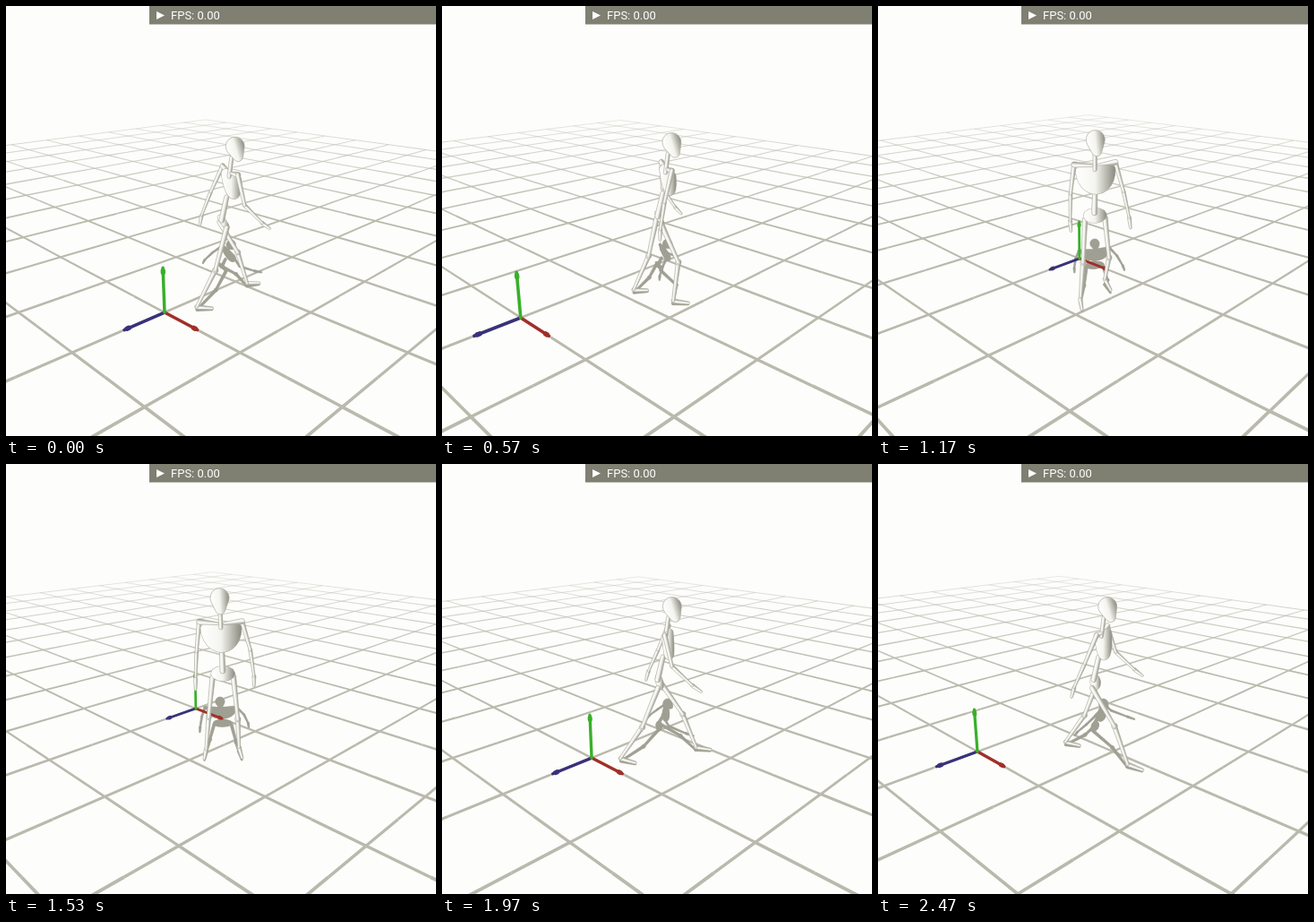
These frames come from a looping animation (480x480 px, 2510 ms). An HTML page with a canvas:

```html
<!DOCTYPE html>
<html lang="en">
<head>
<meta charset="utf-8">
<title>Walking skeleton</title>
<style>
  html, body { margin: 0; width: 100%; height: 100%; overflow: hidden; background: #fdfdfb; }
  canvas { display: block; }
</style>
</head>
<body>
<canvas id="stage" width="480" height="480"></canvas>
<script>
const ctx = document.getElementById('stage').getContext('2d');
const LOOP = 2510, STEP = 100 / 3, RAD = Math.PI / 180;

// Camera: looks down at an angle from HEIGHT, BACK metres away. Points are [right, up, toward].
const FOCAL = 590, HEIGHT = 2.45, BACK = 5;
const SIN = Math.sin(18.3 * RAD), COS = Math.cos(18.3 * RAD);
function project([r, u, t]) {
  const drop = HEIGHT - u, dist = BACK - t;
  const z = dist * COS + drop * SIN, scale = FOCAL / z;
  return { x: 240 + r * scale, y: 240 + (drop * COS - dist * SIN) * scale, z, scale };
}

// The walker stays centred while the world moves past it.
// right, toward: position, speed, acceleration of the world origin; phase 0: left leg forward.
const walks = [
  { start: 0, right: [-.547, -.9, -.743], toward: [.414, .522, -.593],
    heading: -20, turn: 12, phase: 0, rate: 4.1, stride: 24 },
  { start: .965, right: [-.08, -.42, 0], toward: [-.808, -.73, 0],
    heading: 68, turn: 35, phase: 3.81, rate: 2.5, stride: 12 },
  { start: 1.75, right: [-.43, -1.082, 0], toward: [.211, -.29, 0],
    heading: 1, turn: 20, phase: -1.363, rate: 2 * Math.PI, stride: 27 },
];

function line(a, b, color, width) {
  const p = project(a), q = project(b);
  if (p.z < 1 || q.z < 1) return;
  ctx.strokeStyle = color;
  ctx.lineWidth = width * (p.scale + q.scale) / 2;
  ctx.beginPath();
  ctx.moveTo(p.x, p.y);
  ctx.lineTo(q.x, q.y);
  ctx.stroke();
}

const worldPoint = (r, t) => (x, y, z) =>
  [r + (x - z) * Math.SQRT1_2, y, t + (x + z) * Math.SQRT1_2];

function drawGrid(at) {
  const piece = (a, b) => {
    ctx.globalAlpha = Math.min(1, 8 / Math.max(1, project(a).z));
    line(a, b, '#bab9ad', .023);
  };
  ctx.lineCap = 'butt';
  for (let i = -10; i <= 10; i++)
    for (let j = -10; j < 10; j += .5) {
      piece(at(i, 0, j), at(i, 0, j + .5));
      piece(at(j, 0, i), at(j + .5, 0, i));
    }
  ctx.globalAlpha = 1;
}

function drawAxes(at) {
  const axis = (x, y, z, color) => {
    line(at(0, 0, 0), at(x * .47, y * .47, z * .47), color, .03);
    line(at(x * .42, y * .42, z * .42), at(x * .44, y * .44, z * .44), color, .045);
  };
  ctx.lineCap = 'round';
  axis(0, 0, 1, '#38327a');
  axis(1, 0, 0, '#a03028');
  axis(0, 1, 0, '#38b02a');
}

// Limb angles in degrees from straight down, for one side of the body.
function limbAngles(phase, stride) {
  const swing = stride * Math.cos(phase);
  const thigh = 6 + swing, arm = -4 - .65 * swing;
  const knee = 12 + 25 * Math.max(0, -Math.sin(phase));
  return { thigh, shin: thigh - knee, arm, forearm: arm + 16 - .65 * swing };
}

// Returns shapes { points, radii }: tapered bones of two points, or rounded polygons.
function buildSkeleton(heading, phase, stride) {
  const c = Math.cos(heading * RAD), s = Math.sin(heading * RAD);
  const move = ([r, u, t], left, up, fwd) =>
    [r + left * s + fwd * c, u + up, t - left * c + fwd * s];
  const swing = (p, length, angle, spread) => {
    const down = length * Math.cos(angle * RAD);
    return move(p, down * spread, -down, length * Math.sin(angle * RAD));
  };
  const sides = [-1, 1].map(side =>
    ({ side, ...limbAngles(phase + (side < 0 ? Math.PI : 0), stride) }));
  const reach = sides.map(({ thigh, shin }) =>
    .42 * Math.cos(thigh * RAD) + .4 * Math.cos(shin * RAD));
  const root = [.02, .06 + Math.max(...reach), .15];
  const lean = .18 * c - .05;
  const body = (left, up, fwd = 0) => {
    const p = move(root, left, up, fwd);
    p[0] += lean * up;
    return p;
  };
  const shapes = [];
  const bone = (a, b, ra, rb = ra) => shapes.push({ points: [a, b], radii: [ra, rb] });
  const arc = (span, radius, pointAt) => {
    const points = Array.from({ length: 13 }, (_, i) =>
      pointAt(Math.cos(span * i / 12), Math.sin(span * i / 12)));
    shapes.push({ points, radii: [radius] });
  };

  for (const { side, thigh, shin, arm, forearm } of sides) {
    const hip = move(root, side * .1, 0, 0);
    const knee = swing(hip, .42, thigh, side * .1);
    const ankle = swing(knee, .4, shin, side * .07);
    const toe = move(ankle, side * .02, 0, .15);
    toe[1] = .03 + .5 * (ankle[1] - .06);
    bone(hip, knee, .024, .017);
    bone(knee, ankle, .022, .014);
    bone(ankle, toe, .02, .013);
    bone(knee, knee, .028);

    const spread = side > 0 ? .3 : -.1;
    const shoulder = body(side * .2, .54);
    const elbow = swing(shoulder, .29, arm, spread);
    const wrist = swing(elbow, .26, forearm, spread * .5);
    const hand = swing(wrist, .1, forearm + 8, 0);
    bone(body(side * .03, .52), shoulder, .012, .025);
    bone(shoulder, elbow, .02, .014);
    bone(elbow, wrist, .017, .011);
    bone(wrist, hand, .018, .011);
  }
  arc(2 * Math.PI, .015, (x, y) => body(.1 * x, .03 + .05 * y, -.03 * y));
  arc(Math.PI, .04, (x, y) => body(.15 * x, .48 - .18 * y, .02 + .04 * y));
  bone(body(0, .05, -.02), body(0, .28), .026, .022);
  bone(body(0, .48), body(0, .66), .018);
  bone(body(0, .765, .02), body(0, .665, .065), .087, .045);
  return shapes;
}

function traceBone(p, q, rp, rq) {
  const d = Math.hypot(q.x - p.x, q.y - p.y);
  if (d <= Math.abs(rp - rq) + .01) {
    const big = rp > rq ? p : q;
    ctx.arc(big.x, big.y, Math.max(rp, rq), 0, 7);
    return;
  }
  const dir = Math.atan2(q.y - p.y, q.x - p.x), open = Math.acos((rp - rq) / d);
  ctx.arc(p.x, p.y, rp, dir + open, dir - open + 2 * Math.PI);
  ctx.arc(q.x, q.y, rq, dir - open, dir + open);
  ctx.closePath();
}

function paint(points, radii, fill, edge) {
  const draw = (style, width) => {
    ctx.strokeStyle = style;
    ctx.lineWidth = width;
    ctx.stroke();
  };
  ctx.lineJoin = 'round';
  ctx.fillStyle = fill;
  ctx.beginPath();
  if (points.length === 2) {
    traceBone(...points, ...radii);
    ctx.fill();
    draw(edge, .7);
  } else {
    points.forEach(p => ctx.lineTo(p.x, p.y));
    ctx.closePath();
    draw(edge, 2 * radii[0] + 1);
    draw(fill, 2 * radii[0]);
    ctx.fill();
  }
}

function drawShadow(shapes) {
  const color = '#a09f93';
  for (const { points, radii } of shapes) {
    const flat = points.map(([r, u, t]) => project([r, 0, t - u]));
    paint(flat, radii.map((radius, i) => radius * flat[i].scale * .7), color, color);
  }
}

// White on the lit side, grey across the shape's width on the other.
function shade(points, radius) {
  const p = points[0], q = points[points.length - 1];
  const wide = points.length > 2, d = Math.hypot(q.x - p.x, q.y - p.y);
  let nx = 1, ny = 0;
  if (!wide && d > 1) {
    nx = (q.y - p.y) / d;
    ny = (p.x - q.x) / d;
    if (nx < 0) { nx = -nx; ny = -ny; }
  }
  const xs = points.map(point => point.x), mean = (p.y + q.y) / 2;
  const half = wide ? (Math.max(...xs) - Math.min(...xs)) / 2 + radius : radius;
  const mid = (Math.max(...xs) + Math.min(...xs)) / 2;
  const fill = ctx.createLinearGradient(
    mid - nx * half, mean - ny * half, mid + nx * half, mean + ny * half);
  fill.addColorStop(0, '#ffffff');
  fill.addColorStop(.5, '#f4f4ef');
  fill.addColorStop(1, '#8b8b80');
  return fill;
}

function drawBones(shapes) {
  shapes.map(({ points, radii }) => {
    const flat = points.map(project);
    const z = flat.reduce((sum, p) => sum + p.z, 0) / flat.length;
    return { flat, z, sizes: radii.map((radius, i) => radius * flat[i].scale) };
  }).sort((a, b) => b.z - a.z).forEach(({ flat, sizes }) =>
    paint(flat, sizes, shade(flat, Math.max(...sizes)), '#aeada0'));
}

function drawBar() {
  ctx.fillStyle = '#7f7f72';
  ctx.fillRect(160, 0, 320, 20.5);
  ctx.fillStyle = '#fff';
  ctx.beginPath();
  ctx.moveTo(168, 6);
  ctx.lineTo(177, 10.5);
  ctx.lineTo(168, 15);
  ctx.fill();
  ctx.font = '13px Roboto, sans-serif';
  ctx.fillText('FPS: 0.00', 184, 15);
}

function frame(now) {
  const time = Math.floor((now % LOOP + 4) / STEP) * STEP / 1000;
  const walk = walks.findLast(({ start }) => time >= start);
  const t = time - walk.start;
  const along = ([position, speed, acceleration]) => position + speed * t + acceleration * t * t;
  const at = worldPoint(along(walk.right), along(walk.toward));
  const shapes = buildSkeleton(
    walk.heading + walk.turn * t, walk.phase + walk.rate * t, walk.stride);

  ctx.fillStyle = '#fdfdfb';
  ctx.fillRect(0, 0, 480, 480);
  drawGrid(at);
  drawShadow(shapes);
  drawAxes(at);
  drawBones(shapes);
  drawBar();
  requestAnimationFrame(frame);
}
requestAnimationFrame(frame);
</script>
</body>
</html>
```
